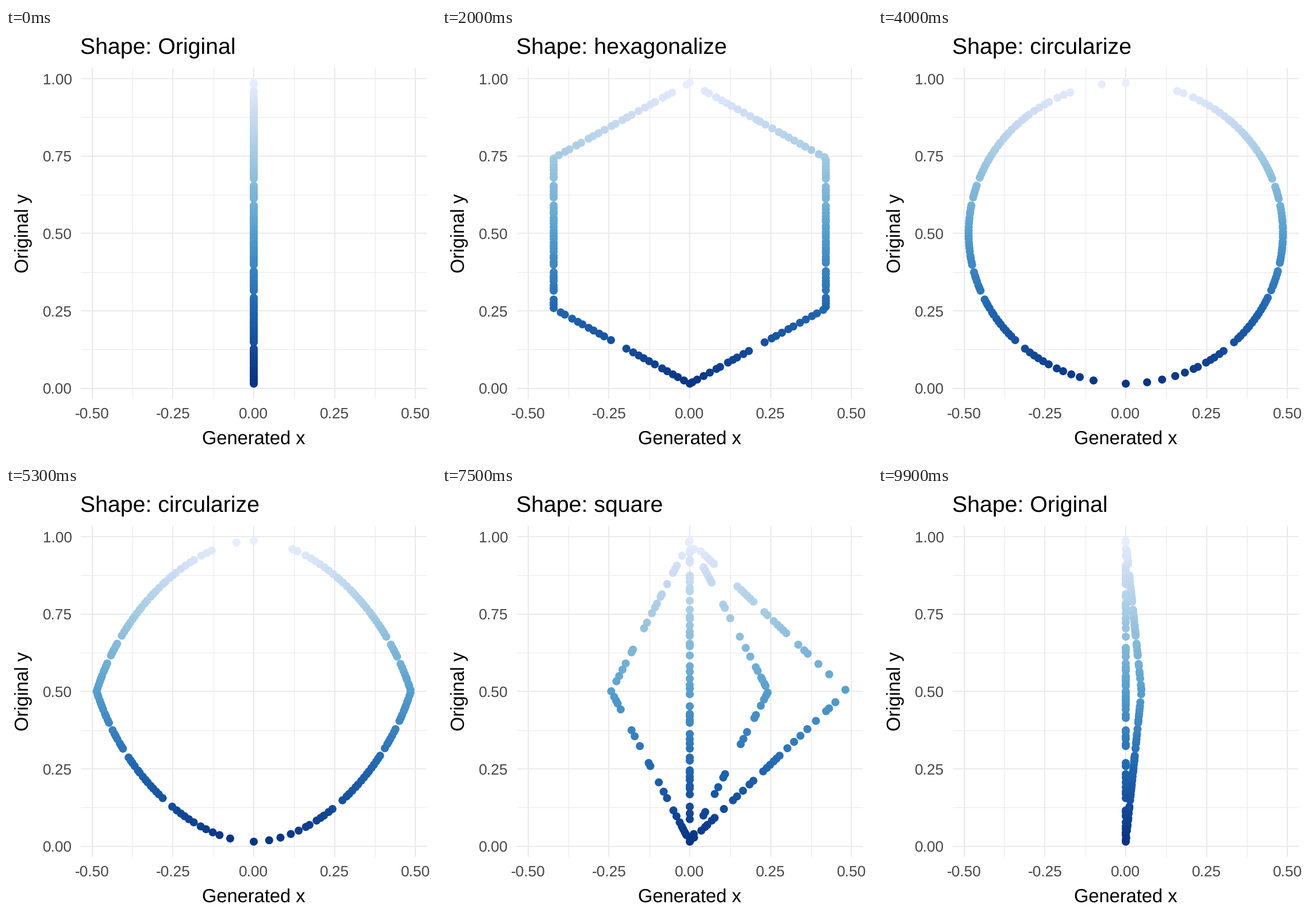
A matplotlib script for the animation above (10000 ms loop, 748 by 748 pixels).

```python
import numpy as np
import matplotlib.pyplot as plt
from matplotlib.animation import FuncAnimation
from matplotlib.colors import LinearSegmentedColormap

plt.rcParams["font.family"] = "Liberation Sans"
plt.rcParams["text.hinting"] = "none"

SIZE, DPI = 748, 100
PT = 72 / DPI                      # points per pixel
X0, X_UNIT = 431, 562.5            # pixel of x = 0, pixels per unit of x
Y0, Y_UNIT = 626.5, 538.5
TOP, BOTTOM = 95.3, 618.7          # highest and lowest dot
LEFT_EDGE, RIGHT_EDGE, UP_EDGE, LOW_EDGE = 130, 732, 69, 645

COUNT = 174
HOLD, MOVE = 10, 10                # frames of rest and of travel per shape
NAMES = ["Original", "hexagonalize", "circularize", "square", "triangularize"]
GAPS = {99: 8, 266: 8, 297: 7, 412: 8, 461: 8, 547: 10}   # start: length

rng = np.random.default_rng(7)


def dot_heights():
    """Unevenly spaced heights from top to bottom that skip the gaps."""
    room = BOTTOM - TOP - sum(GAPS.values())
    rank = np.arange(COUNT, dtype=float)
    rank[1:-1] += rng.uniform(-0.45, 0.45, COUNT - 2)
    y = TOP + rank / (COUNT - 1) * room
    for start, length in GAPS.items():
        y[y > start] += length
    return y


y = dot_heights()
side = np.where(np.arange(COUNT) % 2, -1, 1)     # dots alternate right, left
upright = rng.random(COUNT) < 0.4                # upright side of the triangle

half = (BOTTOM - TOP) / 2
end_gap = half - abs(y - (TOP + BOTTOM) / 2)     # distance to the nearer tip
root3 = np.sqrt(3)
widths = [
    np.zeros(COUNT),
    side * np.minimum(end_gap * root3, half * root3 / 2),
    side * np.sqrt(np.maximum(half ** 2 - (half - end_gap) ** 2, 0)),
    side * end_gap,
    np.where(upright, 0, end_gap),
]
shapes = [X0 + w * X_UNIT / Y_UNIT for w in widths]

fig = plt.figure(figsize=(SIZE / DPI, SIZE / DPI), dpi=DPI, facecolor="white")
ax = fig.add_axes([0, 0, 1, 1])
ax.set(xlim=(0, SIZE), ylim=(SIZE, 0))
ax.axis("off")


def label(px, py, text, size, **kw):
    return ax.text(px, py, text, fontsize=size * PT, va="baseline", **kw)


def grid(values, lw):
    style = dict(color="#EAEAEA", lw=lw * PT, solid_capstyle="butt", zorder=1)
    for v in values:
        gx, gy = X0 + (v - 0.5) * X_UNIT, Y0 - v * Y_UNIT
        ax.plot([gx, gx], [UP_EDGE, LOW_EDGE], **style)
        ax.plot([LEFT_EDGE, RIGHT_EDGE], [gy, gy], **style)


ticks = np.linspace(0, 1, 5)
grid(ticks[:-1] + 0.125, 1.1)
grid(ticks, 2)

for v in ticks:
    label(X0 + (v - 0.5) * X_UNIT, 679, f"{v - 0.5:.2f}", 26.2,
          ha="center", color="#474747")
    label(115, Y0 - v * Y_UNIT + 9.5, f"{v:.2f}", 26.2,
          ha="right", color="#474747")

label(X0, 725, "Generated x", 32.7, ha="center")
label(39.5, 357, "Original y", 32.7, ha="center", rotation=90,
      rotation_mode="anchor")
title = label(129.5, 45, "", 39.2, ha="left")

blues = LinearSegmentedColormap.from_list("blues", [
    (0, "#0A3484"), (0.25, "#2268B0"), (0.5, "#579FCD"),
    (0.75, "#A3CAE1"), (0.9, "#CFDDF3"), (1, "#E8EEFC")])
shade = (BOTTOM - y) / (BOTTOM - TOP)
dots = ax.scatter(shapes[0], y, s=(14 * PT) ** 2, c=blues(shade),
                  linewidths=0, zorder=3)


def draw(frame):
    now, step = divmod(frame, HOLD + MOVE)
    after = (now + 1) % len(shapes)
    t = max(0, step - HOLD) / MOVE
    dots.set_offsets(np.column_stack([shapes[now] * (1 - t) + shapes[after] * t, y]))
    title.set_text("Shape: " + NAMES[after if t > 0.5 else now])
    return dots, title


anim = FuncAnimation(fig, draw, frames=len(shapes) * (HOLD + MOVE), interval=100,
                     init_func=lambda: draw(0), repeat=True, repeat_delay=0)
plt.show()
```
